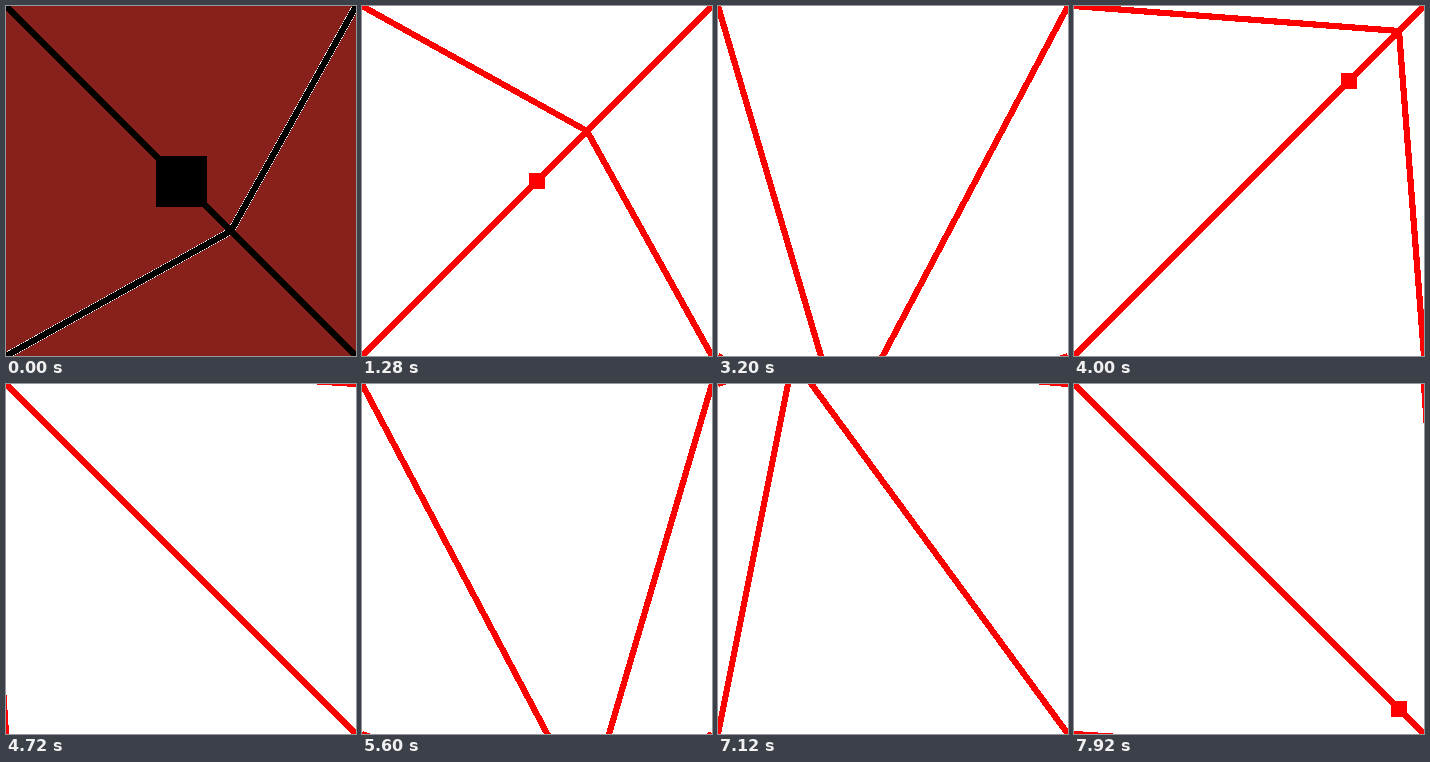
An HTML page for the animation above (8 s loop, 350 by 350 pixels).

```html
<!DOCTYPE html>
<html lang="en">
<head>
<meta charset="utf-8">
<title>Bouncing square</title>
<style>
  html, body { margin: 0; width: 100%; height: 100%; overflow: hidden; background: #fff; }
  svg { display: block; width: 350px; height: 350px; }
</style>
</head>
<body>
<svg viewBox="0 0 350 350" shape-rendering="crispEdges">
  <rect id="back" width="350" height="350"/>
  <path id="fringe" fill="none" stroke="#fff" stroke-width="7.2"/>
  <path id="lines" fill="none" stroke-width="6.2"/>
  <rect id="box"/>
</svg>
<script>
const SIZE = 350, STEP = 50, TICK = 80, TICKS = 100;
const [back, fringe, lines, box] =
  ['back', 'fringe', 'lines', 'box'].map(id => document.getElementById(id));

const outside = v => v < 0 || v > SIZE;

// Only one axis may bounce per tick, so the square rattles along the floor and ceiling.
function walk(count) {
  let x = SIZE / 2, y = SIZE / 2, dx = STEP, dy = STEP;
  const path = [];
  for (let i = 0; i <= count; i++) {
    path.push([x, y]);
    if (outside(x)) dx = -dx;
    else if (outside(y)) dy = -dy;
    x += dx;
    y += dy;
  }
  return path;
}

const path = walk(TICKS);

function setAttrs(el, attrs) {
  for (const name in attrs) el.setAttribute(name, attrs[name]);
}

function draw(tick) {
  const first = tick === 0;
  const [x, y] = path[tick];
  const hub = path[tick + 1].join(' ');
  const ray = (cx, cy) => `M${cx} ${cy}L${hub}`;
  const side = ray(SIZE, 0) + ray(0, SIZE);
  const ink = first ? '#000' : '#f00';
  const edge = first ? 51 : 16;
  const half = Math.floor(edge / 2);

  setAttrs(back, { fill: first ? '#88211c' : '#fff' });
  setAttrs(fringe, { d: first ? side : '' });
  setAttrs(lines, { d: side + ray(0, 0) + ray(SIZE, SIZE), stroke: ink });
  setAttrs(box, { x: x - half, y: y - half, width: edge, height: edge, fill: ink });
}

let start, shown = -1;
function frame(now) {
  start ??= now;
  const tick = Math.floor((now - start) / TICK) % TICKS;
  if (tick !== shown) draw(shown = tick);
  requestAnimationFrame(frame);
}

draw(0);
requestAnimationFrame(frame);
</script>
</body>
</html>
```
